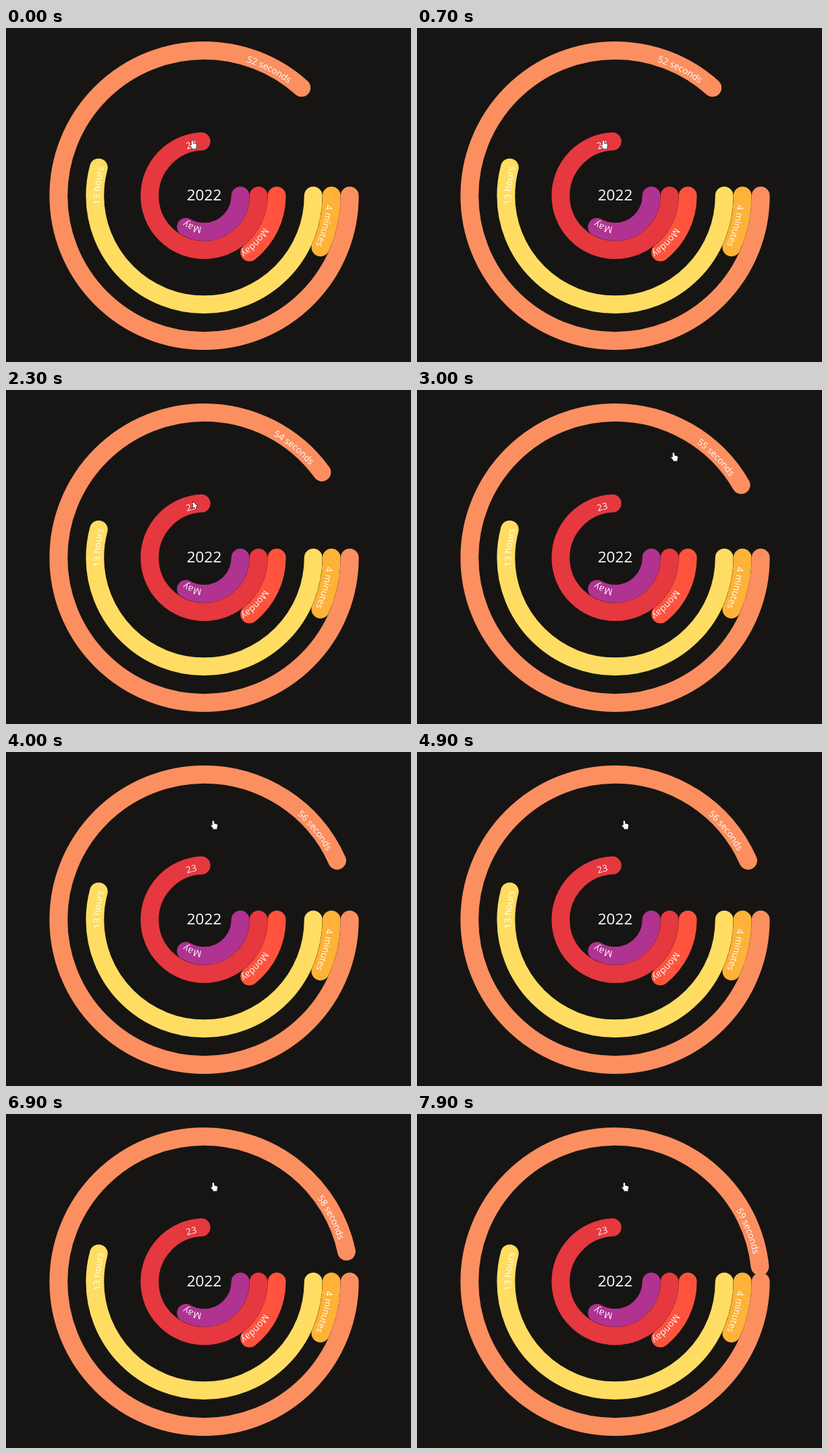
Write an HTML page with a canvas that moves like this. It is 600 px wide and 496 px high and loops after 8 s.

```html
<!DOCTYPE html>
<html lang="en">
<head>
<meta charset="utf-8">
<title>Radial clock</title>
<style>
  html, body { margin: 0; width: 100%; height: 100%; overflow: hidden; background: #161513; }
  canvas { display: block; }
</style>
</head>
<body>
<canvas id="stage" width="600" height="496"></canvas>
<script>
const ctx = document.getElementById('stage').getContext('2d');
const LOOP = 8000, CX = 293.5, CY = 249, RING = 27;
const FONT = '"Open Sans", "Noto Sans", sans-serif';
const rad = deg => deg * Math.PI / 180;

// slot: ring number from the centre; lead: degrees from the label's start to the arc's end
const rings = [
  { slot: 2, color: '#b03391', turn: 4 / 12, lead: 26, label: 'May' },
  { slot: 3, color: '#e5383f', turn: 23 / 31, lead: 17.3, label: '23' },
  { slot: 4, color: '#ff533d', turn: 1 / 7, lead: 23.4, label: 'Monday' },
  { slot: 6, color: '#ffdd63', turn: 13 / 24, lead: 19.8, label: '13 hours' },
  { slot: 7, color: '#feb237', turn: 4 / 60, lead: 19.8, label: '4 minutes' },
  { slot: 8, color: '#fc8f60', lead: 24.6 }
];

// Pointer tip over time: ms, x, y
const moves = [
  [0, 276, 167], [900, 276, 167], [1200, 275, 166], [1900, 275, 166],
  [2300, 277, 166], [2500, 277, 166], [3000, 380, 93], [3700, 307, 102], [LOOP, 307, 102]
];
const arrow = new Path2D('M0 0V9.5L2.2 7.5L3.8 11L5.4 10.3L3.9 7H6.8Z');
const hand = new Path2D('M-1.2 .8Q0 -.8 1.2 .8V4.3L5.4 5.3Q6.6 5.7 6.4 7L5.5 10.5V12.5H-.3V11L-3.4 7.4Q-3.5 5.8 -1.2 7.3Z');

function arcText(text, r, start) {
  ctx.font = '13.5px ' + FONT;
  let angle = start;
  for (const ch of text) {
    const w = ctx.measureText(ch).width;
    angle += w / r / 2;
    ctx.save();
    ctx.translate(CX, CY);
    ctx.rotate(angle + Math.PI / 2);
    ctx.fillText(ch, 0, -r);
    ctx.restore();
    angle += w / r / 2;
  }
}

function drawRing({ slot, color, turn, lead, label }) {
  const r = slot * RING - 0.3;
  const end = turn * 2 * Math.PI;
  ctx.strokeStyle = color;
  ctx.lineWidth = 26.8;
  ctx.lineCap = 'round';
  ctx.beginPath();
  ctx.arc(CX, CY, r, 0, end);
  ctx.stroke();
  ctx.fillStyle = '#fff';
  arcText(label, r - 7.5, end - rad(lead));
}

function drawPointer(t) {
  const i = moves.findIndex(m => m[0] > t);
  const [t0, x0, y0] = moves[i - 1], [t1, x1, y1] = moves[i];
  const p = (t - t0) / (t1 - t0), k = p * p * (3 - 2 * p);
  const shape = t >= 1000 && t < 2600 ? arrow : hand;
  ctx.save();
  ctx.translate(x0 + (x1 - x0) * k, y0 + (y1 - y0) * k);
  ctx.lineWidth = 1.2;
  ctx.lineJoin = 'round';
  ctx.strokeStyle = '#161513';
  ctx.stroke(shape);
  ctx.fillStyle = '#fff';
  ctx.fill(shape);
  ctx.restore();
}

function draw(now) {
  const t = now % LOOP;
  const seconds = 52 + Math.floor(t / 1000);
  const last = rings[rings.length - 1];
  last.turn = seconds / 60;
  last.label = seconds + ' seconds';

  ctx.fillStyle = '#161513';
  ctx.fillRect(0, 0, 600, 496);
  ctx.textAlign = 'center';
  rings.forEach(drawRing);
  ctx.font = '22.6px ' + FONT;
  ctx.fillText('2022', CX, 256);
  drawPointer(t);
}

const begin = performance.now();
function tick() {
  draw(performance.now() - begin);
  requestAnimationFrame(tick);
}
tick();
</script>
</body>
</html>
```
